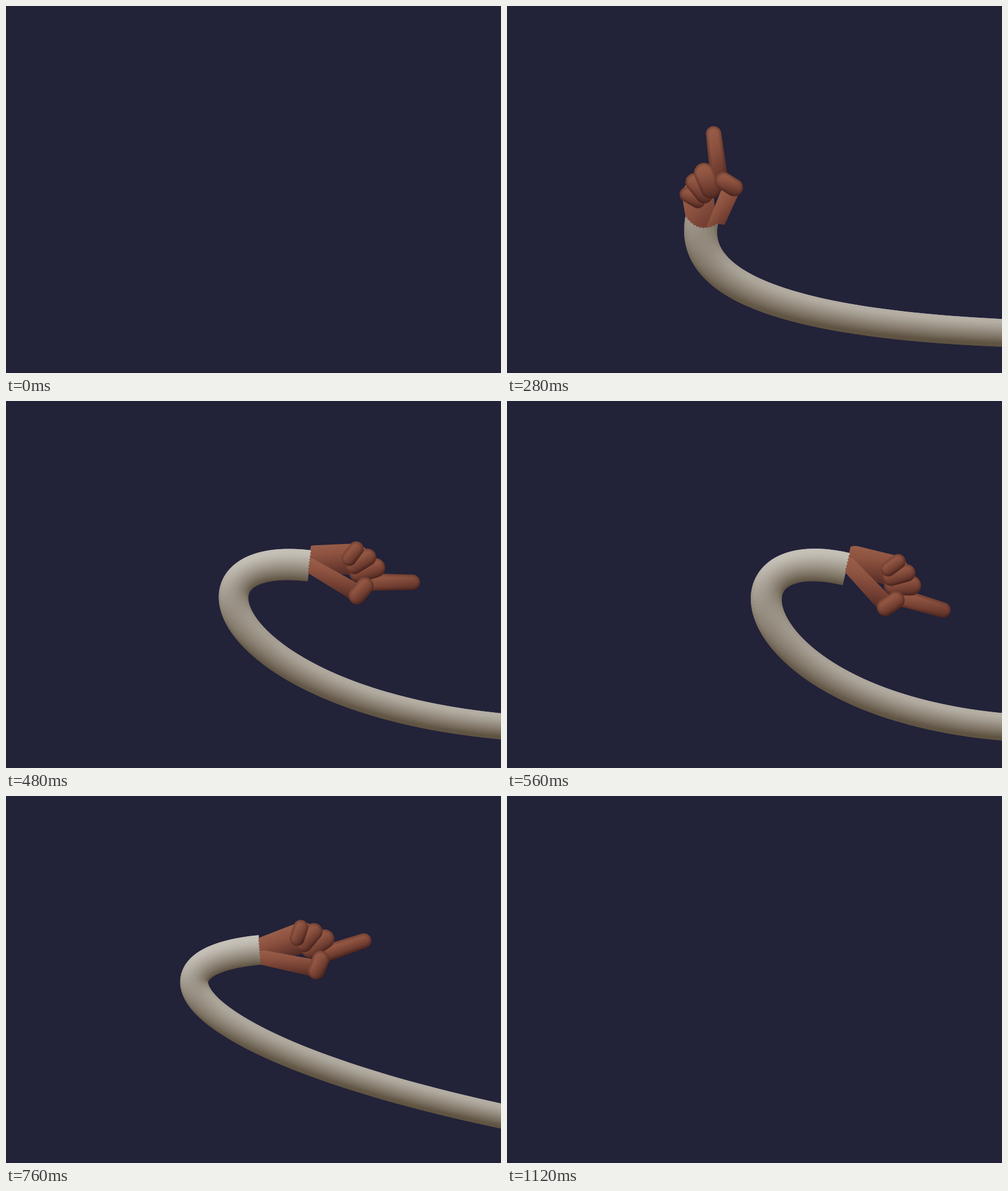
Write an HTML page with a canvas that moves like this. It is 869 px wide and 644 px high and loops after 1.2 s.

```html
<!DOCTYPE html>
<html lang="en">
<head>
<meta charset="utf-8">
<title>Pointing arm</title>
<style>
  html, body { margin: 0; width: 100%; height: 100%; overflow: hidden; background: #222239; }
  canvas { display: block; }
</style>
</head>
<body>
<canvas id="stage" width="869" height="644"></canvas>
<script>
const ctx = document.getElementById('stage').getContext('2d');
const LOOP = 1200, STEP = 40, SHOW = 120, HIDE = 1120;
const SHOULDER = [940, 576];

// The arm is one Bezier curve from wrist to shoulder with handles a and b.
// tuck pulls the hand back into the sleeve, side moves it across the wrist.
const pose = (wrist, a, b, angle, girth, tuck = 0, side = 0) =>
  [...wrist, ...a, ...b, angle, girth, tuck, side];

const out   = pose([990, 585], [1000, 590], [1010, 595], -133, 37, 58, -16);
const reach = pose([706, 446], [760, 522], [840, 566], -127, 39, 58, -16);
const far   = pose([250, 335], [183, 430], [300, 560], -72, 26, 20);
const turn  = pose([352, 283], [165, 348], [325, 535], -42, 26);
const curl  = pose([596, 295], [340, 235], [420, 560], 18, 29, 0, -23);
const tight = pose([610, 299], [354, 239], [434, 563], 24, 30, 0, -23);
const swing = pose([446, 270], [198, 293], [342, 460], -17, 26);
const open  = pose([392, 285], [200, 350], [345, 492], -38, 25);
const lift  = pose([566, 350], [515, 455], [630, 545], -88, 27, 35, 4);

const motion = [
  [80, out], [200, reach], [320, far], [360, turn], [560, curl],
  [640, tight], [760, swing], [800, open], [920, lift], [1120, out]
];

// Capsules in hand space: x along the pointing finger, y towards the thumb.
const cap = (x1, y1, r1, x2, y2, r2 = r1) => ({ x1, y1, r1, x2, y2, r2 });
const palm = cap(9, 3, 24, 77, 1, 27);
const heel = cap(2, 15, 13, 79, 57, 15);
const index = cap(100, 40, 15, 179, 38, 13);
const thumb = cap(97, 47, 15, 84, 64);
const curled = [0, 1, 2].map(k =>
  cap(114 - 11 * k - 3 * k * k, 15 - 20 * k + 2 * k * k, 17 - 2 * k, 86 - 9 * k, 24 - 12 * k));

// Monotone cubic interpolation between poses.
function sample(track, t) {
  const last = track.length - 1;
  let k = 0;
  while (k < last - 1 && track[k + 1][0] <= t) k++;
  const span = track[k + 1][0] - track[k][0], u = (t - track[k][0]) / span;
  const slope = (i, j) => (track[i + 1][1][j] - track[i][1][j]) / (track[i + 1][0] - track[i][0]);
  const tangent = (i, j) => {
    if (i === 0) return slope(0, j);
    if (i === last) return slope(last - 1, j);
    const a = slope(i - 1, j), b = slope(i, j);
    return a * b <= 0 ? 0 : 2 * a * b / (a + b);
  };
  return track[k][1].map((v, j) => {
    const d = track[k + 1][1][j] - v, m = tangent(k, j) * span, n = tangent(k + 1, j) * span;
    return v + u * (m + u * (3 * d - 2 * m - n + u * (m + n - 2 * d)));
  });
}

const clamp = v => Math.max(0, Math.min(1, v));
const mix = (a, b, u) => `rgb(${a.map((v, i) => Math.round(v + (b[i] - v) * u))})`;

// Points along the arm with radius and unit normal.
function armPoints(p, girth, count = 90) {
  const bezier = (u, c) => {
    const v = 1 - u;
    return v * v * v * p[c] + 3 * v * v * u * p[c + 2] + 3 * v * u * u * p[c + 4] + u * u * u * p[c + 6];
  };
  const pts = [];
  for (let i = 0; i <= count; i++) {
    const u = i / count, e = .002;
    const dx = bezier(u + e, 0) - bezier(u - e, 0), dy = bezier(u + e, 1) - bezier(u - e, 1);
    const len = Math.hypot(dx, dy) || 1;
    pts.push({ x: bezier(u, 0), y: bezier(u, 1), r: girth * (1 - .18 * u), nx: -dy / len, ny: dx / len });
  }
  return pts;
}

function drawSleeve(pts) {
  const dark = [94, 82, 65], light = [197, 192, 183];
  const edge = (p, side) => [p.x + side * p.nx * p.r, p.y + side * p.ny * p.r];
  for (let i = pts.length - 2; i >= 0; i--) {
    const a = pts[i], b = pts[Math.min(i + 2, pts.length - 1)];
    const glow = .3 + Math.max(0, 430 - a.y) * .0012;
    const g = ctx.createLinearGradient(...edge(a, -1), ...edge(a, 1));
    for (let k = 0; k <= 8; k++) {
      const s = k / 4 - 1;
      const lit = s * (-.12 * a.nx - .9 * a.ny) + .3 * Math.sqrt(1 - s * s);
      g.addColorStop(k / 8, mix(dark, light, clamp(glow + .62 * lit)));
    }
    ctx.fillStyle = g;
    ctx.beginPath();
    ctx.moveTo(...edge(a, -1));
    ctx.lineTo(...edge(b, -1));
    ctx.lineTo(...edge(b, 1));
    ctx.lineTo(...edge(a, 1));
    ctx.fill();
  }
}

// Rounded, tapered limb lit from the upper left, drawn in stage space.
function drawCapsule(x1, y1, r1, x2, y2, r2, outlined) {
  const dx = x2 - x1, dy = y2 - y1, len = Math.hypot(dx, dy) || 1;
  const ax = dx / len, ay = dy / len, dir = Math.atan2(dy, dx);
  const spread = Math.acos(Math.max(-1, Math.min(1, (r1 - r2) / len)));
  ctx.save();
  ctx.beginPath();
  ctx.arc(x1, y1, r1, dir + spread, dir - spread + 2 * Math.PI);
  ctx.arc(x2, y2, r2, dir - spread, dir + spread);
  ctx.closePath();

  const lx = -.35, ly = -.94, along = .7 * (lx * ax + ly * ay);
  let gx = lx - along * ax, gy = ly - along * ay;
  const gl = Math.hypot(gx, gy);
  gx /= gl;
  gy /= gl;
  const span = Math.max(r1, r2) + Math.abs(ax * gx + ay * gy) * len / 2;
  const mx = (x1 + x2) / 2, my = (y1 + y2) / 2;
  const g = ctx.createLinearGradient(mx + gx * span, my + gy * span, mx - gx * span, my - gy * span);
  ['#9a604b', '#8d5340', '#733f32', '#4e2a23'].forEach((c, i) => g.addColorStop(i / 3, c));
  ctx.fillStyle = g;
  ctx.fill();
  if (outlined) {
    ctx.clip();
    ctx.strokeStyle = 'rgba(62,28,22,.13)';
    for (const w of [10, 6, 3]) {
      ctx.lineWidth = w;
      ctx.stroke();
    }
  }
  ctx.restore();
}

// Shows only what lies ahead of a slightly ragged cuff line.
function clipAtCuff(w, bulge) {
  const put = (side, ahead) =>
    ctx.lineTo(w.x + w.nx * side - w.ny * ahead, w.y + w.ny * side + w.nx * ahead);
  ctx.beginPath();
  for (let i = -10; i <= 10; i++) {
    const s = i / 10;
    put(s * w.r, -1 - bulge * (1 - s * s) + (i % 2 ? 1 : -1));
  }
  put(260, 0);
  put(260, 300);
  put(-260, 300);
  put(-260, 0);
  ctx.clip();
}

function drawHand(wrist, deg, girth, tuck, side) {
  const a = deg * Math.PI / 180, cos = Math.cos(a), sin = Math.sin(a);
  const scale = 1 + (girth - 26) * .008;
  const place = (x, y) => {
    const u = x * scale - tuck, v = y * scale + side;
    return [wrist.x + u * cos - v * sin, wrist.y + u * sin + v * cos];
  };
  const part = (c, outlined) => drawCapsule(
    ...place(c.x1, c.y1), c.r1 * scale, ...place(c.x2, c.y2), c.r2 * scale, outlined);
  const fingers = sin < -.75 ? [...curled].reverse() : curled;
  ctx.save();
  clipAtCuff(wrist, tuck * .38);
  part(palm, false);
  part(heel, false);
  [index, ...fingers, thumb].forEach(c => part(c, true));
  ctx.restore();
}

function draw(t) {
  ctx.fillStyle = '#222239';
  ctx.fillRect(0, 0, 869, 644);
  if (t < SHOW || t >= HIDE) return;
  const now = sample(motion, t);
  const [deg, girth, tuck, side] = now.slice(6);
  const pts = armPoints([...now.slice(0, 6), ...SHOULDER], girth);
  drawSleeve(pts);
  drawHand(pts[0], deg, girth, tuck, side);
}

function tick() {
  draw(Math.floor(performance.now() % LOOP / STEP) * STEP);
  requestAnimationFrame(tick);
}
tick();
</script>
</body>
</html>
```
